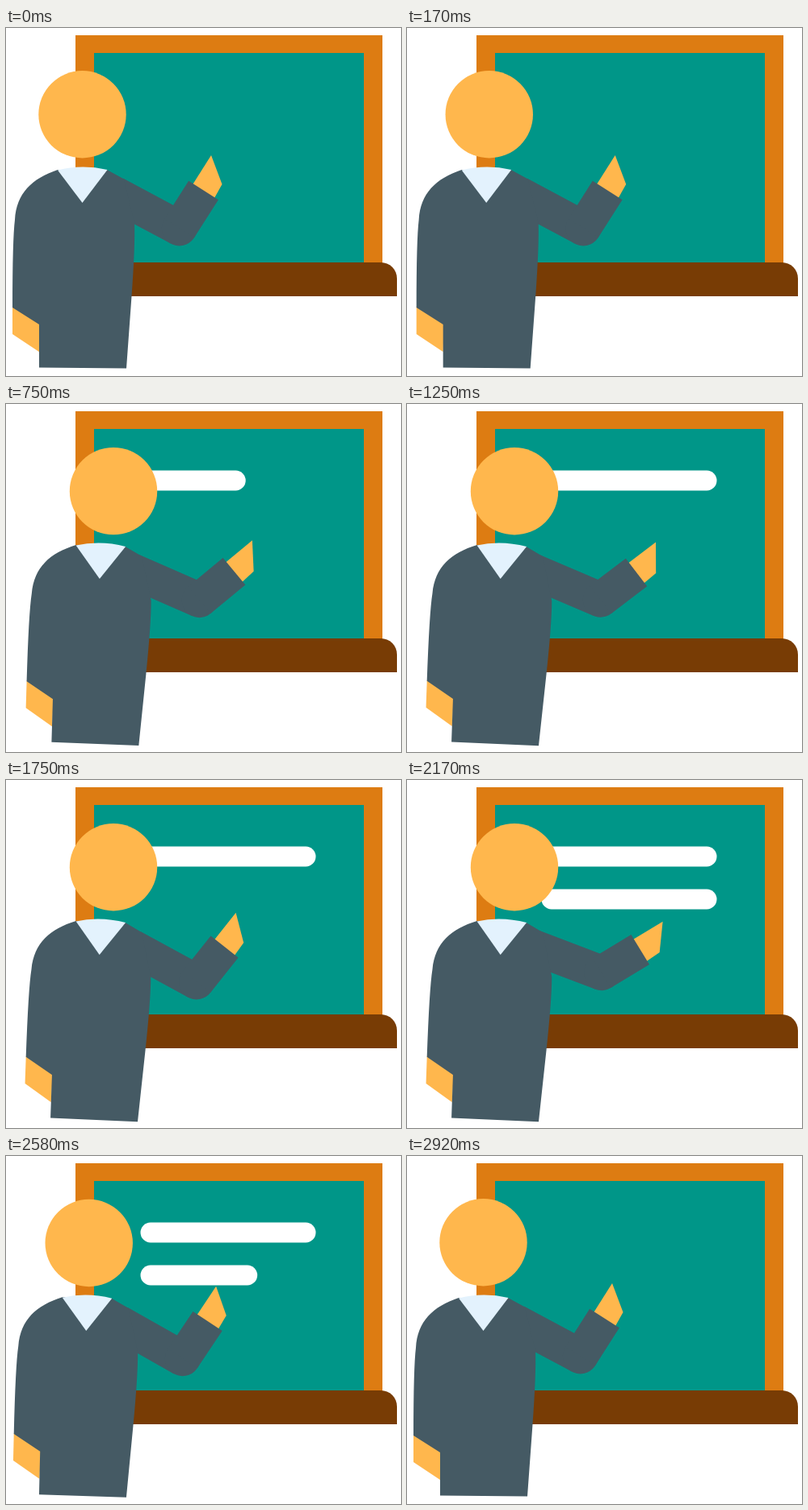
Recreate the animation shown at these times as an HTML page with a canvas. Size 489 px wide and 432 px high, loop 6010 ms.

```html
<!DOCTYPE html>
<html lang="en">
<head>
<meta charset="utf-8">
<title>Teacher at the board</title>
<style>
  html, body { margin: 0; width: 100%; height: 100%; overflow: hidden; background: #fff; }
  canvas { display: block; }
</style>
</head>
<body>
<canvas id="stage" width="489" height="432"></canvas>
<script>
const ctx = document.getElementById('stage').getContext('2d');
const LOOP = 6010, STEP = 1000 / 12, LAST_STEP = 35;
const SKIN = '#ffb74d', SUIT = '#455a64', SHIRT = '#e3f2fd';
const FRAME = '#dd7c12', BOARD = '#009688', LEDGE = '#783c05';

// Joints of the figure at rest
const NECK = [95, 179], SHOULDER = [135, 206], ELBOW = [214.6, 248.7], CUFF = [244.5, 201.5];
const SLEEVE = 43.5;

const ramp = (k, from, to) => Math.min(1, Math.max(0, (k - from) / (to - from)));
const smooth = (k, from, to) => {
  const u = ramp(k, from, to);
  return u * u * (3 - 2 * u);
};

function pose(k) {
  return {
    shift: 22.5 * (smooth(k, 0, 7.8) - smooth(k, 27.7, 32.6)),
    lean: 2 * (smooth(k, 3, 11) - smooth(k, 28.5, 35)),
    head: 38.5 * (smooth(k, 0, 7.2) - smooth(k, 27.7, 32.4)),
    reach: ramp(k, 5, 11) - ramp(k, 14, 18) + ramp(k, 20, 26) - ramp(k, 26, 30),
    lines: [
      ramp(k, 6, 11) - ramp(k, 32, 35),
      ramp(k, 21, 26) - ramp(k, 30, 33)
    ]
  };
}

function rect(color, x, y, w, h, radii = 0) {
  ctx.fillStyle = color;
  ctx.beginPath();
  ctx.roundRect(x, y, w, h, radii);
  ctx.fill();
}

function disc(color, x, y, r) {
  ctx.fillStyle = color;
  ctx.beginPath();
  ctx.arc(x, y, r, 0, Math.PI * 2);
  ctx.fill();
}

function polygon(color, ...points) {
  ctx.fillStyle = color;
  ctx.beginPath();
  points.forEach(p => ctx.lineTo(...p));
  ctx.fill();
}

function limb(from, to) {
  ctx.strokeStyle = SUIT;
  ctx.lineWidth = SLEEVE;
  ctx.beginPath();
  ctx.moveTo(...from);
  ctx.lineTo(...to);
  ctx.stroke();
}

function rotateAbout([x, y], degrees) {
  ctx.translate(x, y);
  ctx.rotate(degrees * Math.PI / 180);
  ctx.translate(-x, -y);
}

function drawBoard(lines) {
  rect(FRAME, 86, 9, 380, 283);
  rect(BOARD, 109, 31, 334, 260);
  rect(LEDGE, 86, 291, 398, 42, [0, 20, 0, 0]);
  lines.forEach((part, i) => {
    if (part > 0) rect('#fff', 166.5, 82.5 + 53 * i, 217 * part, 25, 12.5);
  });
}

function drawArm(reach) {
  ctx.save();
  rotateAbout(SHOULDER, -9.4 * reach);
  limb(SHOULDER, ELBOW);
  disc(SUIT, ...ELBOW, SLEEVE / 2);
  rotateAbout(ELBOW, 33.8 * reach);
  polygon(SKIN, [230, 196], [254, 158], [267.5, 194], [258, 211]);
  limb(ELBOW, CUFF);
  ctx.restore();
}

function drawTorso() {
  polygon(SKIN, [8, 346], [42, 367], [41, 402], [8, 380]);
  ctx.fillStyle = SUIT;
  ctx.beginPath();
  ctx.moveTo(64, 176);
  ctx.bezierCurveTo(32, 187, 13, 205, 11, 238);
  ctx.quadraticCurveTo(8, 262, 8, 347);
  ctx.lineTo(41, 368);
  ctx.lineTo(41, 421.5);
  ctx.lineTo(149, 422.5);
  ctx.lineTo(155.5, 333);
  ctx.quadraticCurveTo(160, 270, 159, 242);
  ctx.lineTo(146, 187.5);
  ctx.lineTo(125, 176);
  ctx.fill();
}

function drawCollar() {
  ctx.fillStyle = SHIRT;
  ctx.beginPath();
  ctx.moveTo(64, 176.5);
  ctx.quadraticCurveTo(94, 169, 125.5, 176);
  ctx.lineTo(94.5, 217);
  ctx.fill();
}

function draw(now) {
  const k = Math.min(LAST_STEP, Math.floor((now % LOOP + 4) / STEP));
  const { shift, lean, head, reach, lines } = pose(k);
  ctx.fillStyle = '#fff';
  ctx.fillRect(0, 0, 489, 432);
  drawBoard(lines);
  ctx.save();
  ctx.translate(shift, 0);
  rotateAbout(NECK, lean);
  drawArm(reach);
  drawTorso();
  drawCollar();
  ctx.restore();
  disc(SKIN, 94.5 + head, 107.3 + lean / 2, 54.2);
}

let start;
function tick(now) {
  start ??= now;
  draw(now - start);
  requestAnimationFrame(tick);
}
draw(0);
requestAnimationFrame(tick);
</script>
</body>
</html>
```
